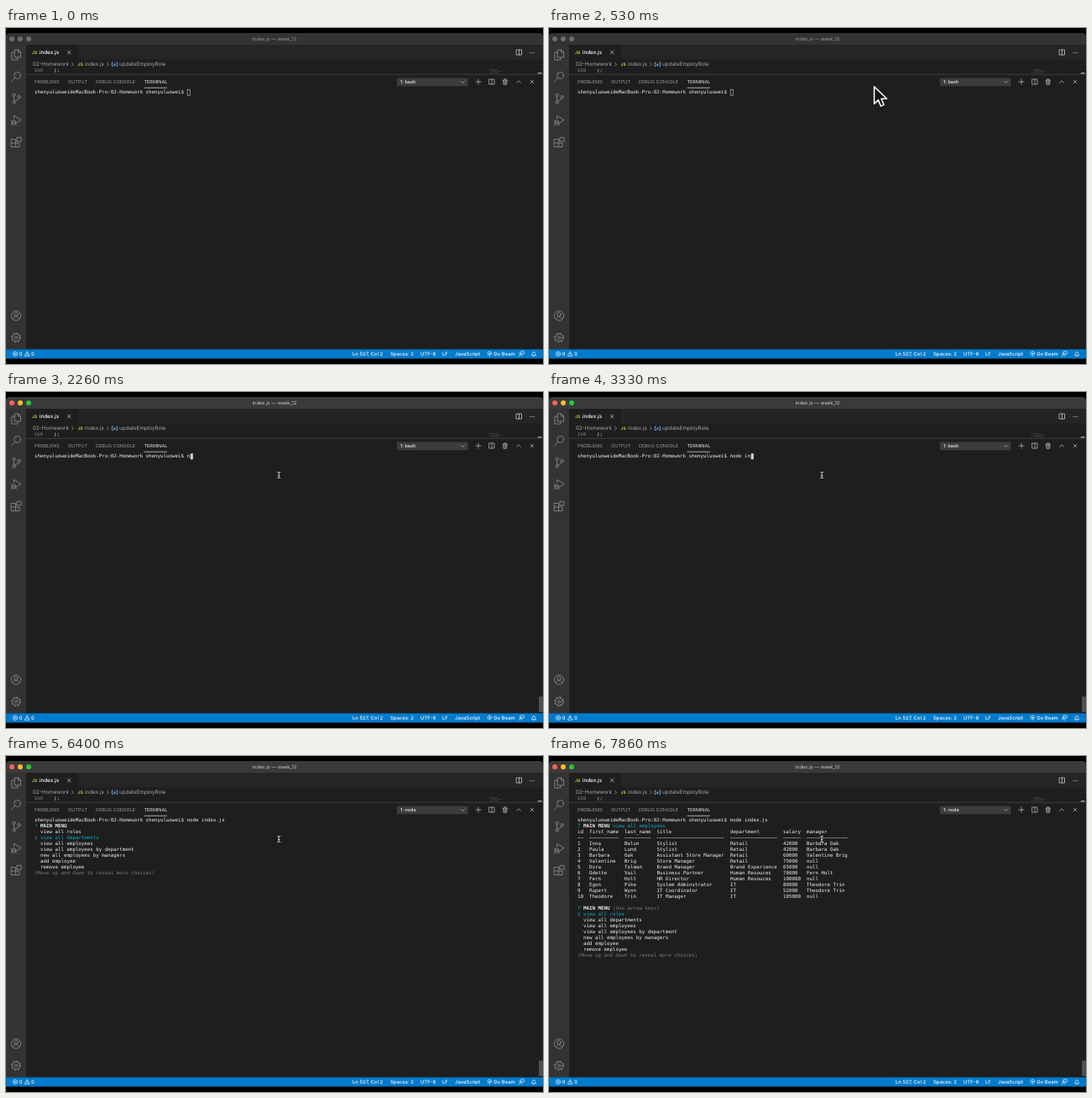
These frames come from a looping animation (640x400 px, 8000 ms). An HTML page:

```html
<!DOCTYPE html>
<html lang="en">
<head>
<meta charset="utf-8">
<title>Terminal menu</title>
<style>
  html, body { margin: 0; width: 100%; height: 100%; overflow: hidden; background: #000; }
  svg { display: block; width: 640px; height: 400px; }
  text { font-family: Inter, "Open Sans", sans-serif; font-size: 6.3px; text-rendering: geometricPrecision; white-space: pre; }
  .mono, .mono text { font-family: "DejaVu Sans Mono", monospace; font-size: 5.814px; }
  .tabs text { font-size: 5.5px; }
  .status text { font-size: 5.9px; fill: #fff; font-weight: 500; }
  .line { fill: none; stroke-width: .8; stroke-linecap: round; stroke-linejoin: round; }
</style>
</head>
<body>
<svg viewBox="0 0 640 400">
  <rect width="640" height="400" fill="#000"/>
  <g id="win">
    <path d="M0 393.5V10.500Q0 6 4.500 6H635.500Q640 6 640 10.500V393.500Z" fill="#1e1e1e"/>
    <path id="bar" d="M0 20V10.500Q0 6 4.500 6H635.500Q640 6 640 10.500V20Z"/>
    <g id="lights"><circle cx="7" cy="13" r="3"/><circle cx="17" cy="13" r="3"/><circle cx="27" cy="13" r="3"/></g>
    <text id="title" x="320" y="15.100" text-anchor="middle" style="font-size:5.85px">index.js — week_12</text>

    <!-- editor tabs and breadcrumb -->
    <rect x="24" y="20" width="616" height="17.500" fill="#252526"/>
    <rect x="24" y="20" width="62" height="17.500" fill="#1e1e1e"/>
    <g fill="#cbcb41" font-weight="700"><text x="31" y="31" style="font-size:5px">JS</text><text x="85.500" y="45.200" style="font-size:5px">JS</text></g>
    <text x="39.800" y="31.100" fill="#fff" font-weight="500">index.js</text>
    <g fill="#a9a9a9">
      <text x="32" y="45.400">02-Homework</text>
      <text x="94" y="45.400">index.js</text>
      <text x="135" y="45.400">updateEmployRole</text>
    </g>
    <g class="line" stroke="#a0a0a0">
      <path d="M78.500 41.200l2 2-2 2M120.500 41.200l2 2-2 2"/>
    </g>
    <path class="line" stroke="#75beff" d="M127.500 41h-1.200v4.500h1.200M131.500 41h1.200v4.500h-1.200M128.300 43.600l1.300-.9 1.300.5-1.300 1zM129.500 44.200v.6"/>
    <g class="line" stroke="#c4c4c4">
      <path d="M73.500 27.200l3.600 3.600M77.100 27.200l-3.600 3.600"/>
      <path d="M608.500 26h6v6h-6zM611.500 26v6"/>
    </g>
    <g fill="#c4c4c4"><circle cx="625" cy="29.300" r=".6"/><circle cx="627.200" cy="29.300" r=".6"/><circle cx="629.400" cy="29.300" r=".6"/></g>

    <!-- sliver of code above the panel -->
    <g class="mono" clip-path="url(#sliver)">
      <text x="33.500" y="52" fill="#858585">150</text><text x="57" y="52" fill="#d4d4d4">};</text>
    </g>
    <clipPath id="sliver"><rect x="24" y="48.200" width="600" height="6.500"/></clipPath>
    <path d="M575.300 48.500v5.500" stroke="#3a3a3a" stroke-width=".6"/>
    <path d="M577 49.500h9M578 51.400h14M577 53.200h11" stroke="#6a6a6a" stroke-width=".7" stroke-dasharray="2.500 .8" opacity=".7"/>
    <path d="M633 54.500l1.500-1.500h4v1.500z" fill="#a0a0a0"/>
    <rect x="24" y="54.800" width="616" height=".7" fill="#4a4a4a"/>

    <!-- panel header -->
    <g class="tabs" fill="#979797">
      <text x="34" y="66.100">PROBLEMS</text><text x="74" y="66.100">OUTPUT</text>
      <text x="107" y="66.100">DEBUG CONSOLE</text><text x="164.500" y="66.100" fill="#e7e7e7">TERMINAL</text>
      <rect x="164.500" y="70.800" width="27.500" height=".7" fill="#e7e7e7"/>
      <rect x="466" y="59.500" width="84.500" height="9.800" rx="1" fill="#3c3c3c"/>
      <text id="shell" x="470" y="66.300" fill="#f0f0f0" font-weight="500"></text>
    </g>
    <g class="line" stroke="#b8b8b8" style="stroke-width:.75">
      <path d="M542.500 63.400l2 2 2-2"/>
      <path d="M563 61v6M560 64h6"/>
      <path d="M576 61h6v6h-6zM579 61v6"/>
      <path d="M592 62.200h5.600M593.800 62v-1.200h2V62M592.700 62.400l.3 4.900h3.600l.3-4.900M594 63.600v2.400M595.600 63.600v2.400"/>
      <path d="M608.600 65.300l2.400-2.500 2.400 2.500"/>
      <path d="M625.200 62.200l3.600 3.600M628.800 62.200l-3.600 3.600"/>
    </g>

    <!-- activity bar -->
    <rect y="20" width="24" height="362.500" fill="#333"/>
    <g class="line" stroke="#868686" style="stroke-width:.9">
      <path d="M10.500 26h4.500l2.500 2.500v6.500h-7zM14.500 26v3h3M10.500 29H6.800v9h7v-3"/>
      <circle cx="13.500" cy="56.500" r="3.900"/><path d="M10.700 59.400l-4.200 4.500"/>
      <circle cx="9.500" cy="79.700" r="1.700"/><circle cx="9.500" cy="88.500" r="1.700"/><circle cx="15.500" cy="82" r="1.700"/>
      <path d="M9.500 81.400v5.400M15.500 83.700c0 2.500-4 1.600-5.400 3.200"/>
      <path d="M9.500 108v-3.700l8.500 5.200-5.500 3.500"/><circle cx="9.300" cy="112.600" r="2.500"/>
      <path d="M6.800 112.600h5M6 109.800l1.300 1M6 115.500l1.300-1M12.600 115.500l-1.300-1"/>
      <path d="M6.500 132.500h5v9h-5zM6.500 137h9.500v4.500h-5M13.300 130.300h4.700v4.700h-4.700z"/>
      <circle cx="12" cy="342.500" r="5.700"/><circle cx="12" cy="340.900" r="2.200"/><path d="M8.200 346.500c.8-4 6.800-4 7.600 0"/>
      <circle cx="12" cy="368.600" r="1.600"/><circle cx="12" cy="368.600" r="4.500"/>
      <circle cx="12" cy="368.600" r="5.300" style="stroke-width:1.100;stroke-linecap:butt" stroke-dasharray="1.900 2.263"/>
    </g>

    <!-- status bar -->
    <rect y="382.500" width="640" height="11" fill="#007acc"/>
    <g class="status">
      <text x="15.800" y="390.100">0</text><text x="30" y="390.100">0</text>
      <text x="413" y="390.100">Ln 527, Col 2</text><text x="458" y="390.100">Spaces: 2</text>
      <text x="494" y="390.100">UTF-8</text><text x="520" y="390.100">LF</text>
      <text x="535" y="390.100">JavaScript</text><text x="581.300" y="390.100">Go Beam</text>
    </g>
    <g class="line" stroke="#fff" style="stroke-width:.65">
      <circle cx="11" cy="388" r="2.600"/><path d="M10 387l2 2M12 387l-2 2"/>
      <path d="M25.300 385.500l2.700 4.900h-5.400zM25.300 387.300v1.400"/>
      <circle cx="576.300" cy="387.600" r=".7"/><path d="M576.300 388.600v2M574.700 389.500a2.500 2.500 0 1 1 3.200 0"/>
      <circle cx="613" cy="387.500" r="1"/><path d="M611.200 390.700c.3-2.300 3.300-2.300 3.600 0M613 385h4.200v3h-1l-1.100 1.100v-1.100"/>
      <path d="M626.600 389.500c.9-.8.700-1.600.8-2.500a1.700 1.700 0 0 1 3.300 0c.1.900-.1 1.700.8 2.500zM628.500 390.500h1"/>
    </g>

    <rect id="thumb" x="635" y="362.500" width="5" height="18.500" fill="#4f4f4f"/>
    <g id="term" class="mono"></g>
    <rect id="caret" width="3.200" height="7"/>
  </g>
  <path id="arrow" d="M0 0V17L4 13.200L6.600 19.300L9.600 18L7 12H12.500Z" fill="#111" stroke="#fff" stroke-width="1.300" stroke-linejoin="round"/>
  <path id="beam" class="line" stroke="#e8e8e8" d="M323.600 95.300q1.600 0 1.600 1.100q0-1.100 1.600-1.100M325.200 96.400v5M323.600 102.500q1.600 0 1.600-1.100q0 1.100 1.600 1.100M324.400 99.500h1.600"/>
</svg>
<script>
const LOOP = 8000, LEFT = 34, CELL = 3.5, ROW = 7, BASE = 78.1;
const WHITE = '#f0f0f0', CYAN = '#11a8cd', GREEN = '#0dbc79', GRAY = '#7a7a7a';
const $ = id => document.getElementById(id);

const user = 'shenyuluowei';
const prompt = `${user}deMacBook-Pro:02-Homework ${user}$ `;
const command = 'node index.js';
const choices = ['view all roles', 'view all departments', 'view all employees',
  'view all employees by department', 'new all employees by managers', 'add employee', 'remove employee'];

const columns = [0, 4, 16, 27, 52, 70, 78];
const widths = [2, 10, 9, 23, 16, 6, 14];
const table = [
  'id|first_name|last_name|title|department|salary|manager',
  widths.map(n => '\u2013'.repeat(n)).join('|'),
  '1|Inna|Belun|Stylist|Retail|42000|Barbara Oak',
  '2|Paula|Lund|Stylist|Retail|42000|Barbara Oak',
  '3|Barbara|Oak|Assistant Store Manager|Retail|60000|Valentine Brig',
  '4|Valentine|Brig|Store Manager|Retail|75000|null',
  '5|Dora|Tolman|Brand Manager|Brand Experience|65000|null',
  '6|Odette|Vail|Business Partner|Human Resouces|70000|Fern Holt',
  '7|Fern|Holt|HR Director|Human Resouces|100000|null',
  '8|Egon|Pike|System Adminstrator|IT|80000|Theodore Trin',
  '9|Rupert|Wynn|IT Coordinator|IT|52000|Theodore Trin',
  '10|Theodore|Trin|IT Manager|IT|105000|null'
];

// [start, value] steps
const typing = [[0, 0], [2260, 1], [2460, 2], [2600, 3], [2700, 4], [2800, 5], [3060, 6], [3330, 7], [3460, 13]];
const pointer = [[0, null], [60, [352, 176, .42]], [160, [408, 118, .42]], [260, [362, 132, .6]],
  [400, [421, 92, 1.1]], [530, [387.6, 69.8, 1.2]], [600, [336, 92, 1.2]], [800, [214, 128, .8]],
  [1130, [124.3, 147.5, .43]], [1400, null]];
const drift = [[0, [0, 0]], [1130, [-.4, .7]], [1400, [0, 0]]];
const at = (steps, t) => steps.filter(s => s[0] <= t).pop()[1];

function print(out, row, col, str, fill = WHITE, weight = 400) {
  out.push(`<text x="${LEFT + col * CELL}" y="${BASE + row * ROW}" fill="${fill}" font-weight="${weight}">${str}</text>`);
}

function heading(out, row, note, fill) {
  print(out, row, 0, '?', GREEN);
  print(out, row, 2, 'MAIN MENU', WHITE, 700);
  print(out, row, 12, note, fill);
}

function menu(out, row, picked, hint) {
  heading(out, row, hint ? '(Use arrow keys)' : '', GRAY);
  choices.forEach((name, i) => {
    const on = i === picked;
    if (on) print(out, row + 1 + i, 0, '\u276f', CYAN);
    print(out, row + 1 + i, 2, name, on ? CYAN : WHITE);
  });
  print(out, row + 8, 0, '(Move up and down to reveal more choices)', GRAY);
}

function terminal(t) {
  const out = [];
  print(out, 0, 0, prompt + command.slice(0, at(typing, t)));
  if (t >= 7860) {
    heading(out, 1, choices[2], CYAN);
    table.forEach((line, r) => line.split('|').forEach((cell, c) => print(out, r + 2, columns[c], cell)));
    menu(out, 15, 0, true);
  } else if (t >= 4400) {
    menu(out, 1, t < 6400 ? 0 : t < 6860 ? 1 : 2, t < 6400);
  }
  return out.join('');
}

function set(el, attrs) {
  for (const k in attrs) el.setAttribute(k, attrs[k]);
}

let shown = '';
function draw(t) {
  const focus = t >= 1400;
  set($('win'), { transform: `translate(${at(drift, t)})` });
  set($('bar'), { fill: focus ? '#3a3a3a' : '#333' });
  set($('title'), { fill: focus ? '#ccc' : '#999' });
  const lamps = focus ? ['#ff5f57', '#febc2e', '#28c840'] : ['#6c6c6c', '#6c6c6c', '#6c6c6c'];
  [...$('lights').children].forEach((c, i) => set(c, { fill: lamps[i] }));
  set($('thumb'), { visibility: focus ? 'visible' : 'hidden' });
  set($('beam'), { visibility: focus ? 'visible' : 'hidden' });
  $('shell').textContent = t < 4400 ? '1: bash' : '1: node';

  const entered = t >= 4260;
  set($('caret'), {
    x: LEFT + .2 + (entered ? 0 : (prompt.length + at(typing, t)) * CELL),
    y: entered ? 80.2 : 73.2,
    fill: focus ? '#d0d0d0' : 'none', stroke: focus ? 'none' : '#ccc', 'stroke-width': .6,
    visibility: t < 4400 ? 'visible' : 'hidden'
  });

  const p = at(pointer, t);
  set($('arrow'), { visibility: p ? 'visible' : 'hidden' });
  if (p) set($('arrow'), { transform: `translate(${p[0]} ${p[1]}) scale(${p[2]})` });

  const text = terminal(t);
  if (text !== shown) $('term').innerHTML = shown = text;
}

const start = performance.now();
function tick() {
  draw((performance.now() - start) % LOOP);
  requestAnimationFrame(tick);
}
tick();
</script>
</body>
</html>
```
